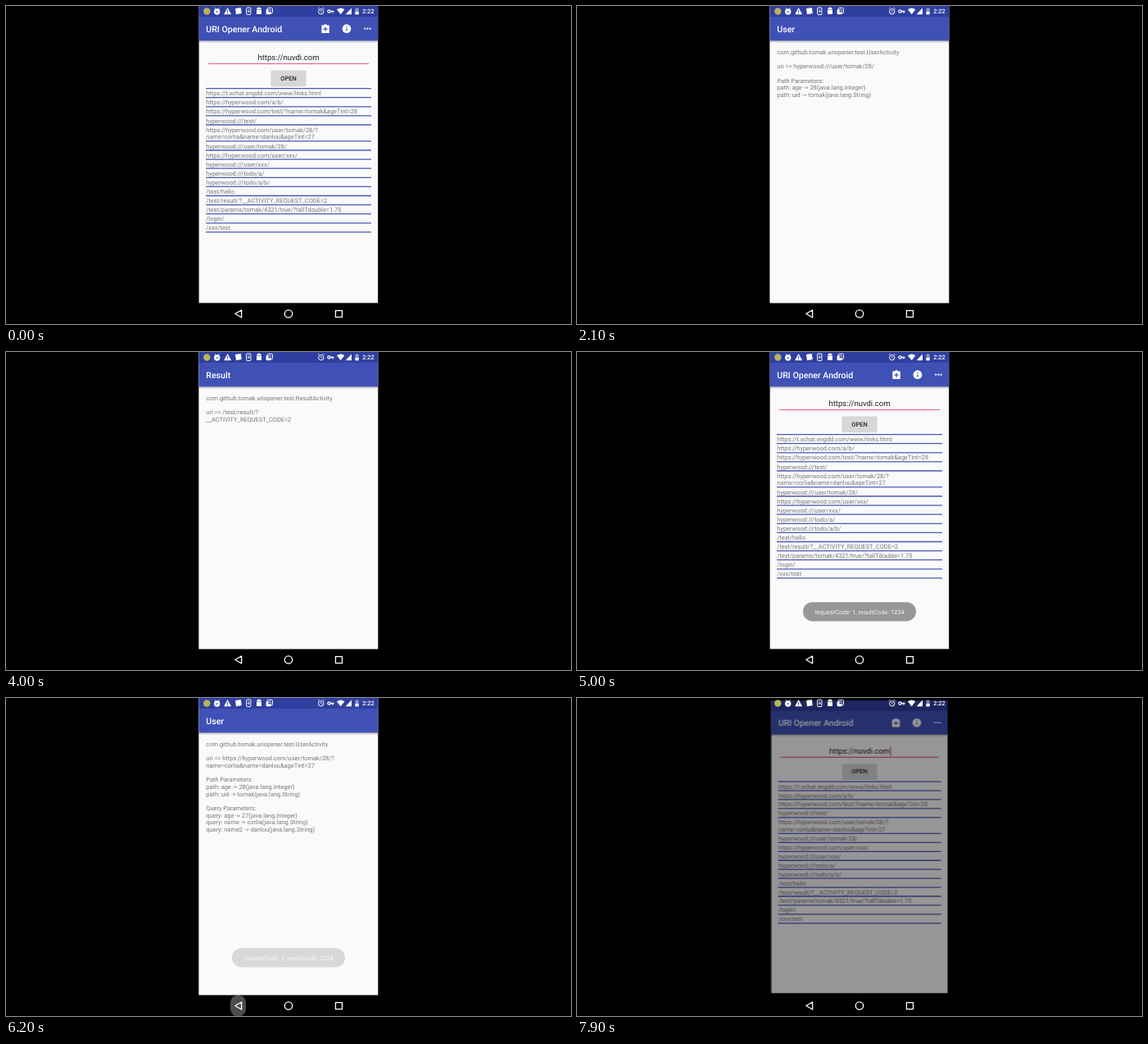
Animation of 690x388 px, one loop 8000 ms. Source, as an HTML page:

```html
<!DOCTYPE html>
<html lang="en">
<head>
<meta charset="utf-8">
<title>URI Opener Android</title>
<style>
html, body { margin: 0; width: 100%; height: 100%; overflow: hidden; background: #000; }
svg { display: block; width: 100vw; height: 100vh; }
text { font-family: Roboto, "Noto Sans CJK SC", "Noto Sans CJK", sans-serif; text-rendering: geometricPrecision; white-space: pre; }
.body { font-size: 7.43px; fill: #777; }
.title { font-size: 10.6px; font-weight: 500; fill: #fff; }
.news { font-size: 9.55px; fill: #333; }
.meta { font-size: 6.6px; fill: #999; }
.mid { text-anchor: middle; }
.line { fill: none; stroke: #fff; }
.thin { fill: none; stroke: #999; stroke-width: .8; }

#home { transform-origin: 345px 194px; animation: home 8s linear infinite; }
#cursor { animation: blink 8s step-end infinite; }
#toast { opacity: 0; animation: toast 8s linear infinite; }
#browser { opacity: 0; transform-origin: 345px 194px; animation: browser 8s linear infinite; }
#content { animation: content 8s step-end infinite; }
#progress { animation: progress 8s ease-out infinite; }
.page { opacity: 0; }
.ripple { opacity: 0; animation: ripple 8s linear infinite; }

@keyframes home {
  0%, 87% { opacity: 1; transform: none; }
  87.01%, 95.5% { opacity: 0; transform: scale(.94); }
  98.75% { opacity: .6; transform: scale(.985); }
  100% { opacity: .95; transform: none; }
}
@keyframes blink {
  0%, 15.6%, 38.1%, 70%, 84% { opacity: 0; }
  1.25%, 11.5%, 32.5%, 65.6%, 78%, 95% { opacity: 1; }
}
@keyframes toast {
  0%, 59.4% { opacity: 0; }
  60.6%, 76.25% { opacity: 1; }
  78.15%, 100% { opacity: 0; }
}
@keyframes browser {
  0%, 82.5% { opacity: 0; transform: translateY(28px); }
  85.6%, 92.5% { opacity: 1; transform: none; }
  95.5%, 100% { opacity: 0; transform: translateY(20px) scale(.96); }
}
@keyframes content { 0% { opacity: 0; } 87.5% { opacity: 1; } }
@keyframes progress {
  0%, 85.6% { width: 0; }
  90%, 91% { width: 153px; }
  94%, 100% { width: 218px; }
}
@keyframes ripple {
  0% { opacity: .2; x: 275px; width: 17px; }
  .9% { opacity: .3; x: 274px; width: 19px; }
  1.8% { opacity: .14; x: 256px; width: 56px; }
  3.75% { opacity: .04; x: 256px; width: 56px; }
  4.7%, 100% { opacity: 0; x: 256px; width: 56px; }
}
</style>
</head>
<body>
<svg viewBox="0 0 690 388">
  <defs>
    <clipPath id="screen"><rect x="235.6" width="218.6" height="362.6"/></clipPath>
    <linearGradient id="shade" x2="0" y2="1">
      <stop stop-opacity=".28"/><stop offset="1" stop-opacity="0"/>
    </linearGradient>
    <g id="app">
      <rect x="235.6" width="218.6" height="362.6" fill="#fafafa"/>
      <rect x="235.6" y="42" width="218.6" height="3.5" fill="url(#shade)"/>
      <rect x="235.6" y="12" width="218.6" height="30.3" fill="#3f51b5"/>
      <rect x="235.6" width="218.6" height="13" fill="#303f9f"/>
    </g>
  </defs>
  <rect width="690" height="388"/>

  <g clip-path="url(#screen)">
    <g id="home">
      <use href="#app"/>
      <text class="title" x="244.3" y="31.6">URI Opener Android</text>
      <g fill="#fff">
        <path d="M385.4 23.6h2.7a2.1 2.1 0 0 1 4 0h2.7v9.3h-9.4z"/>
        <path d="M390.1 25.6v5.2M387.5 28.2h5.2" stroke="#3f51b5" stroke-width="1.3"/>
        <circle cx="416" cy="27.7" r="5.4"/>
        <path d="M416 27v3.6M416 24.6v1.3" stroke="#3f51b5" stroke-width="1.2"/>
        <circle cx="438.2" cy="27.7" r="1.1"/><circle cx="441.4" cy="27.7" r="1.1"/><circle cx="444.6" cy="27.7" r="1.1"/>
      </g>
      <text class="mid" x="345" y="66.3" font-size="9.56" fill="#222">https://nuvdi.com</text>
      <rect id="cursor" x="383.2" y="56.5" width="1" height="12.5" fill="#e8396f"/>
      <path d="M247 70.5h196" stroke="#f0577f" stroke-width="1.2"/>
      <rect x="323.6" y="79.2" width="42.8" height="19" rx="1.2" fill="#000" opacity=".16"/>
      <rect x="323.8" y="78.4" width="42.4" height="18.8" rx="1" fill="#d6d7d7"/>
      <text class="mid" x="345" y="90.5" font-size="7.43" font-weight="500" fill="#222">OPEN</text>
      <g id="links"></g>
    </g>

    <g id="pages"></g>

    <g id="toast">
      <rect x="276" y="305.2" width="138" height="23.3" rx="11.6" fill="#979797"/>
      <text class="mid" x="345" y="319.7" font-size="7.43" fill="#f2f2f2">requestCode: 1, resultCode: 1234</text>
    </g>

    <g id="browser">
      <rect x="235.6" width="218.6" height="362.6" fill="#fff"/>
      <rect x="235.6" width="218.6" height="13"/>
      <g id="content">
        <rect x="235.6" y="42" width="218.6" height="136" fill="#f8f8f8"/>
        <path class="thin" d="M247 54.5a2.6 2.6 0 0 1 0-5 3.6 3.6 0 0 1 6.6 0 2.6 2.6 0 0 1 0 5zM248 56l-.8 2M250.5 56l-.8 2M253 56l-.8 2"/>
        <text x="260" y="57.5" font-size="14.5" font-weight="300" fill="#888">10°</text>
        <text class="meta" x="284" y="50.4">广州</text>
        <text class="meta" x="284" y="58.4">35 优</text>
        <path class="thin" d="M303.5 55l2 2 2-2"/>
        <circle class="thin" cx="439.5" cy="53.3" r="6.5"/><circle class="thin" cx="439.5" cy="51.5" r="2.3"/>
        <path class="thin" d="M435.2 57.8q4.3-5 8.6 0"/>
        <circle cx="344.5" cy="81.5" r="15.5" fill="#2a26dd"/>
        <rect x="244.5" y="105.4" width="201" height="24.4" fill="#fff" stroke="#ccc" stroke-width=".8"/>
        <path d="M392 116.3h4l-2 2.3z" fill="#666"/>
        <rect x="402.6" y="105" width="43.4" height="25.2" fill="#3385ff"/>
        <text class="mid" x="424.3" y="120.6" font-size="8.2" fill="#fff">青禾一下</text>
        <g class="thin">
          <circle cx="255.5" cy="146" r="5.6"/><path d="M255.5 149l-2.6-2.8a1.5 1.5 0 0 1 2.6-1.5 1.5 1.5 0 0 1 2.6 1.5z"/>
          <rect x="286" y="140.8" width="11" height="10.4" rx="1.5"/><path d="M288 143.8h3v2.5h-3zM292.5 144h2.8M292.5 146.3h2.8M288 148.6h7.3"/>
          <path d="M327 142v9M327 142q-3-1.6-5.5-.6v9.2q3-.8 5.5.4 2.500-1.200 5.500-.4v-9.2q-3-.8-5.500.6"/>
          <circle cx="363" cy="146" r="5.6"/><path d="M361.500 143.600l3.800 2.400-3.800 2.400z"/>
          <path d="M434.500 151.600q-4.800-4.200-4.800-7a4.800 4.800 0 0 1 9.600 0q0 2.800-4.800 7z"/><circle cx="434.500" cy="144.800" r="1.700"/>
        </g>
        <rect x="394.500" y="141.500" width="9" height="9" fill="#aaa"/>
        <g id="labels"></g>
        <circle cx="341.300" cy="173" r="1" fill="#777"/><circle cx="345.200" cy="173" r=".8" fill="#ccc"/><circle cx="349" cy="173" r=".8" fill="#ccc"/>
        <text class="news" x="244.300" y="193">83版《落雁江湖录》十大专业户，沈铁岳、顾</text>
        <text class="news" x="244.300" y="207">长野、孟千河已不在</text>
        <text class="meta" x="244.500" y="267">晨野快报</text><text class="meta" x="276" y="267">02-23</text>
        <path d="M244 276h202" stroke="#eee" stroke-width=".8"/>
        <text class="news" x="244.300" y="290.800">星屿青岚除了发布了新手机, 这个小设备更吸引</text>
        <text class="news" x="244.300" y="304.500">人</text>
        <text class="meta" x="244.500" y="364.300">禾川资讯</text><text class="meta" x="276" y="364.300">02-23</text>
      </g>
      <rect x="235.600" y="13" width="218.600" height="29" fill="#f2f2f2"/>
      <rect x="239.500" y="17" width="165" height="21.500" rx="1" fill="#fff" stroke="#ddd" stroke-width=".6"/>
      <rect x="247.600" y="26.200" width="6.800" height="5.400" rx=".7" fill="#0b8043"/>
      <path d="M249.200 26.500v-1.700a1.800 1.800 0 0 1 3.600 0v1.700" fill="none" stroke="#0b8043"/>
      <text x="259.300" y="30.800" font-size="8.500" fill="#444"><tspan fill="#0b8043">https</tspan><tspan fill="#888">://</tspan>www.nuvdi.com</text>
      <rect x="414.800" y="23.500" width="8.600" height="8.600" rx="1" fill="none" stroke="#555"/>
      <text class="mid" x="419.100" y="29.700" font-size="5" font-weight="700" fill="#555">18</text>
      <g fill="#555"><circle cx="441.800" cy="24.300" r="1"/><circle cx="441.800" cy="27.700" r="1"/><circle cx="441.800" cy="31.100" r="1"/></g>
      <rect x="235.600" y="41" width="218.600" height="1.800" fill="#d3e0f5"/>
      <rect id="progress" x="235.600" y="41" width="0" height="1.800" fill="#4f83e0"/>
    </g>
  </g>

  <g id="status" fill="#fff">
    <circle cx="245.300" cy="6.500" r="4.200" fill="#b9b45c"/>
    <circle cx="257.700" cy="7" r="3.700"/><path d="M254.700 2.300l1.600 1.500M260.700 2.300l-1.600 1.500" class="line"/><path d="M256 7h3.400" stroke="#303f9f"/>
    <path d="M270.600 2l4.500 8.300h-9z"/><path d="M270.600 5v2.600M270.600 8.300v1" stroke="#303f9f"/>
    <path d="M280 3l6.800-1 1 7-6.800 1.200z"/>
    <rect x="293.700" y="2" width="5.200" height="8.600" rx=".8" class="line"/><path d="M296.300 4v3.500M294.800 6.200l1.500 1.500 1.500-1.500" class="line" stroke-width=".8"/>
    <path d="M306 4.500h6v5.500h-6z"/><path d="M306.300 4a2.700 2.500 0 0 1 5.400 0z"/>
    <rect x="319" y="2.300" width="6.500" height="6.500" rx="1.200" class="line"/><rect x="317.600" y="4.200" width="6" height="6" rx="1.200"/><circle cx="321.800" cy="6.200" r="1.300" fill="#303f9f"/>
    <circle cx="384.800" cy="6.800" r="3.200" class="line"/><path d="M381 3.300l1.800-1.300M388.600 3.300l-1.800-1.300M384.800 5v2l1.300.8" class="line" stroke-width=".8"/>
    <circle cx="394.600" cy="6.500" r="1.700" class="line" stroke-width="1.300"/><path d="M396.200 6.500h4.300M399 6.500v2" class="line" stroke-width="1.300"/>
    <path d="M404 4.200q4.700-3.600 9.400 0l-4.700 6z"/>
    <path d="M414.600 10.200h7.400V2.400z"/>
    <path d="M426.500 3h1.200v-1h1.800v1h1.200v7.300h-4.200z" opacity=".45"/><path d="M426.500 7h4.200v3.300h-4.200z"/>
    <text x="435.200" y="9.300" font-size="7.430" font-weight="500">2:22</text>
  </g>

  <g id="nav">
    <rect x="235" y="362.600" width="220" height="26"/>
    <g id="ripples" fill="#fff"></g>
    <g class="line" stroke-width="1.300">
      <path d="M287.600 371v9l-7.800-4.500z" stroke-linejoin="round"/>
      <circle cx="345" cy="375.500" r="4.700"/>
      <rect x="402.500" y="371.600" width="8" height="8"/>
    </g>
  </g>
</svg>
<script>
const $ = id => document.getElementById(id);
const esc = s => s.replace(/&/g, '&amp;').replace(/>/g, '&gt;');
const pct = ms => ms / 80 + '%';
const rows = (lines, y, step) => lines.map((s, i) =>
  `<text class="body" x="244.3" y="${y + i * step}">${esc(s)}</text>`).join('');

const links = [
  'https://t.xchat.engdd.com/www/links.html',
  'https://hyperwood.com/a/b/',
  'https://hyperwood.com/test/?name=tomak&ageTint=28',
  'hyperwood:///test/',
  'https://hyperwood.com/user/tomak/28/?\nname=corlia&name=danlou&ageTint=27',
  'hyperwood:///user/tomak/28/',
  'https://hyperwood.com/user/xxx/',
  'hyperwood:///user/xxx/',
  'hyperwood:///todo/a/',
  'hyperwood:///todo/a/b/',
  '/test/hello',
  '/test/result/?__ACTIVITY_REQUEST_CODE=2',
  '/test/params/tomak/4321/true/?tallTdouble=1.75',
  '/login/',
  '/xxx/test'
];
const rule = y => `<path d="M244 ${y}h202" stroke="#4a57bd" stroke-width="1.3"/>`;
let top_ = 100.6, list = rule(top_);
for (const link of links) {
  const lines = link.split('\n');
  list += rows(lines, top_ + 8.6, 8.7);
  top_ += 11.1 + (lines.length - 1) * 8.8;
  list += rule(top_);
}
$('links').innerHTML = list;

const pack = 'com.github.tomak.uriopener.test.';
const pages = [
  { title: 'Test', open: [480, 700], close: [920, 1060], lines: [
    pack + 'TestActivity', '', 'uri => https://hyperwood.com/test/?', 'name=tomak&ageTint=28', '',
    'Query Parameters:', 'query: age -> 28(java.lang.Integer)', 'query: name -> tomak(java.lang.String)'] },
  { title: 'User', open: [1350, 1600], close: [2620, 2770], lines: [
    pack + 'UserActivity', '', 'uri => hyperwood:///user/tomak/28/', '',
    'Path Parameters:', 'path: age -> 28(java.lang.Integer)', 'path: uid -> tomak(java.lang.String)'] },
  { title: 'Result', open: [3400, 3650], close: [4600, 4760], lines: [
    pack + 'ResultActivity', '', 'uri => /test/result/?', '__ACTIVITY_REQUEST_CODE=2'] },
  { title: 'User', open: [5500, 5740], close: [6250, 6400], lines: [
    pack + 'UserActivity', '', 'uri => https://hyperwood.com/user/tomak/28/?', 'name=corlia&name=danlou&ageTint=27', '',
    'Path Parameters:', 'path: age -> 28(java.lang.Integer)', 'path: uid -> tomak(java.lang.String)', '',
    'Query Parameters:', 'query: age -> 27(java.lang.Integer)', 'query: name -> corlia(java.lang.String)',
    'query: name2 -> danlou(java.lang.String)'] }
];
// Each page slides up while fading in, and drops away on return.
const hidden = '{opacity:0;transform:translateY(28px)}';
const shown = '{opacity:1;transform:none}';
const style = document.createElement('style');
style.textContent = pages.map(({ open, close }, i) => `@keyframes page${i} {
  0%, ${pct(open[0])} ${hidden} ${pct(open[1])}, ${pct(close[0])} ${shown} ${pct(close[1])}, 100% ${hidden} }`).join('\n');
document.head.append(style);
$('pages').innerHTML = pages.map(({ title, lines }, i) =>
  `<g class="page" style="animation:page${i} 8s linear infinite"><use href="#app"/>
   <text class="title" x="244.3" y="31.6">${title}</text>${rows(lines, 59, 8.68)}</g>`).join('');

$('ripples').innerHTML = [800, 2500, 6130, 7050].map(ms =>
  `<rect class="ripple" y="362.600" height="26" rx="9" style="animation-delay:${ms}ms"/>`).join('');
$('labels').innerHTML = ['关注', '新闻', '小说', '视频', '麦谷', '地图'].map((s, i) =>
  `<text class="meta mid" x="${255.5 + i * 35.8}" y="160.800">${s}</text>`).join('');
</script>
</body>
</html>
```
